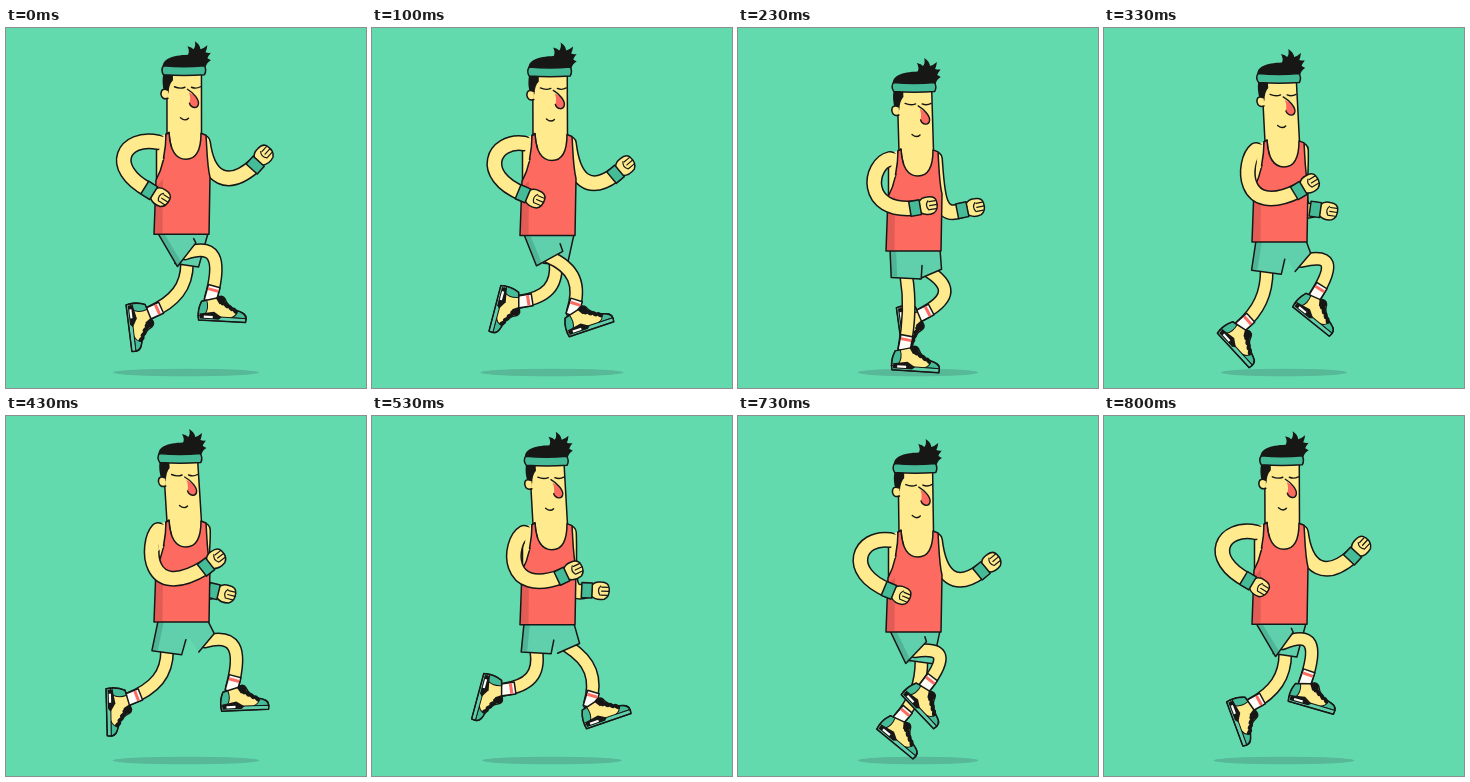
These frames come from a looping animation (360 px wide and 360 px high, 830 ms). An HTML page with a canvas:

```html
<!DOCTYPE html>
<html lang="en">
<head>
<meta charset="utf-8">
<title>Runner</title>
<style>
  html, body { margin: 0; width: 100%; height: 100%; overflow: hidden; background: #63d9ae; }
  canvas { display: block; width: 360px; height: 360px; }
</style>
</head>
<body>
<canvas id="stage"></canvas>
<script>
const canvas = document.getElementById('stage');
const ctx = canvas.getContext('2d');
const dpr = window.devicePixelRatio || 1;
canvas.width = canvas.height = 360 * dpr;

const LOOP = 830, POSES = 25;
const GROUND = '#63d9ae', SHADOW = '#57b997', INK = '#171716', SKIN = '#ffeb8d', SHIRT = '#fd6a60',
      SHORTS = '#60cfab', BAND = '#45bb98', WHITE = '#fffdf8', SHADE = 'rgba(90,20,40,.16)';

// The two ends of each arm swing, relative to the body
const NEAR_ARM = {
  shoulder: [152, 115], bow: 8,
  back: { upper: [118, 108], lower: [100, 140], wrist: [143, 163], turn: 32 },
  front: { upper: [140, 128], lower: [140, 189], wrist: [200, 152], turn: -38 }
};
const FAR_ARM = {
  shoulder: [197, 115], bow: 6,
  back: { upper: [202, 152], lower: [222, 162], wrist: [249, 138], turn: -48 },
  front: { upper: [198, 150], lower: [185, 185], wrist: [207, 176], turn: 14 }
};

const rad = deg => deg * Math.PI / 180;
const wave = (angle, lag = 0) => Math.cos(angle - rad(lag));
const mix = (a, b, t) => a + (b - a) * t;
const mixPoint = (p, q, t) => p.map((v, i) => mix(v, q[i], t));

function paint(d, fill, line = 1.5) {
  const path = new Path2D(d);
  if (fill) { ctx.fillStyle = fill; ctx.fill(path); }
  if (line) { ctx.strokeStyle = INK; ctx.lineWidth = line; ctx.stroke(path); }
}

function place(x, y, angle, draw) {
  ctx.save();
  ctx.translate(x, y);
  ctx.rotate(angle);
  draw();
  ctx.restore();
}

// Bent tube with round ends
function limb(start, c1, c2, end, width) {
  ctx.beginPath();
  ctx.moveTo(...start);
  ctx.bezierCurveTo(...c1, ...c2, ...end);
  for (const [color, w] of [[INK, width], [SKIN, width - 3]]) {
    ctx.strokeStyle = color;
    ctx.lineWidth = w;
    ctx.stroke();
  }
}

function sock() {
  paint('M-13 -6H3V6H-13Z', WHITE);
  paint('M-10.5 -5.2H-7.5V5.2H-10.5Z', SHIRT, 0);
}

function shoe() {
  const body = 'M-9 3L6 -1Q11 -5 14 -1C17 7 24 10 30 11.5Q38 14 36 22L-11 22Q-13 12 -9 3Z';
  paint(body, SKIN, 0);
  paint('M-9 3L-4 1.5Q-1 10 -5 16L-12 16Q-12 9 -9 3Z', BAND, 1);
  paint('M27 11Q37 12 36.5 18L21 18Q27 16 27 11Z', BAND, 1);
  paint('M5 -1Q11 -5 14 -1L15 3L9 5Z', INK, 0);
  ctx.fillStyle = INK;
  for (let i = 0; i < 4; i++) {
    ctx.beginPath();
    ctx.ellipse(11 + i * 4.6, 3 + i * 2.6, 3.6, 2, .9, 0, 2 * Math.PI);
    ctx.fill();
  }
  paint('M-12 17.5L36.5 18L36 22L-11 22Z', SHORTS, 1);
  paint('M-10 15.5L4 13L12 18L9 20.5L-10 20.5Z', INK, 0);
  paint('M-6 17.2H3V19.4H-6Z', WHITE, 0);
  paint(body, null);
}

// angle: place in the stride, zero with the knee raised in front
function leg(angle, dx, waist, near) {
  const lift = ((1 + wave(angle, -14)) / 2) ** 2;
  const bend = rad(112 * lift), thigh = rad(62 * lift - 8), reach = 33 + 12 * lift;
  const cuff = [170 + dx + 9 * wave(angle), waist + 25 - 5 * wave(angle, -14)];
  const knee = [cuff[0] + reach * Math.sin(bend), cuff[1] + reach * Math.cos(bend)];
  const ankle = [
    164 + dx + 42 * wave(angle, 14),
    287 + 17 * wave(angle, 115) + 13 * wave(2 * angle, 200) + 4 * wave(4 * angle, 40)
  ];
  const turn = 43 - 62 * wave(angle, 50);

  const shin = mixPoint(ankle, knee, .7);
  limb(cuff, mixPoint(cuff, knee, .7), shin, ankle, 14);
  place(...ankle, Math.atan2(ankle[1] - shin[1], ankle[0] - shin[0]), sock);
  place(...ankle, rad(turn), shoe);

  const half = near ? 15 : 12;
  const ox = half * Math.cos(thigh), oy = half * Math.sin(thigh);
  const ux = 7 * Math.sin(thigh), uy = 7 * Math.cos(thigh);
  // The hem sits a little below the start of the leg
  const hem = [cuff[0] + ux * .3, cuff[1] + uy * .3];
  const back = [hem[0] - ox, hem[1] + oy], front = [hem[0] + ox, hem[1] - oy];
  const left = near ? 152 : 172, right = near ? 190 : 202;
  paint(`M${left} ${waist}L${back}L${front}L${right} ${waist}Z`, SHORTS, 0);
  if (near) {
    paint(`M${left} ${waist}L${back}L${back[0] + 6} ${back[1] - 1}L${left + 6} ${waist}Z`, 'rgba(0,50,50,.16)', 0);
    paint(`M${left} ${waist}L${back}L${front}L${mixPoint(front, [185, waist], .45)}`);
  } else {
    paint(`M${back}L${front}L${right} ${waist}`);
  }
}

function hand() {
  paint('M5 -5.5Q8 -9.5 14 -9Q22 -9 22.5 -3Q23.5 5 18 8Q10 10 5 5.5Z', SKIN);
  paint('M15 -4H21.5M15 0H22.5M14.5 4H21M14 -5Q10 -1 13.5 4', null, 1.2);
  paint('M-5 -7.5H5.5V7.5H-5Z', BAND);
}

function arm({ shoulder, bow, back, front }, swing, drop) {
  const at = part => {
    const [x, y] = mixPoint(back[part], front[part], swing);
    return [x, y + drop];
  };
  const wrist = at('wrist');
  wrist[1] += 4 * bow * swing * (1 - swing);
  limb([shoulder[0], shoulder[1] + drop], at('upper'), at('lower'), wrist, 16);
  place(...wrist, rad(mix(back.turn, front.turn, swing)), hand);
}

function torso() {
  paint('M159 107L151 110L150.5 156L160 140Z', SKIN, 0);
  paint('M150.5 120V154', null);
  paint('M160 107C160 125 157 140 150 153L148 207H203L204 150C201 138 201 122 200 108L195 106' +
        'C195 124 190 132 180 132C170 132 164 124 163 105Z', SHIRT);
  paint('M149.5 160L157 152L156.5 206H148.8Z', SHADE, 0);
}

// Joins the near arm to the body under the strap
function strap() {
  paint('M153 109L160 110L157.5 132L152 136L153.5 120Z', SKIN, 0);
  paint('M160 107Q160 118 157.5 131L165 122Q163.5 114 163 105.5Z', SHIRT, 0);
  paint('M157.5 131Q160 118 160 107L163 105.5Q163.5 114 165.5 120', null);
}

function head(lean) {
  ctx.save();
  ctx.transform(1, 0, -lean / 64, 1, lean * 107 / 64, 0);
  paint('M161 44H195.5V108C195 124 190 132 180 132C170 132 163 124 161 106Z', SKIN, 0);
  paint('M161 46V107M195.5 46V107', null);
  paint('M157.5 46H167V53Q163 57 162.5 66L158 64Q155.5 55 157.5 46Z', INK, 0);
  paint('M162 63Q155 60 155 67Q156 73 162 71', SKIN);
  paint('M157 40C156 32 166 28 182 27.5Q184 24 181.5 19Q186 20 187.5 22Q190 19 189 14' +
        'Q194 17 194.5 22Q198 21 201.5 18Q201 22 199.5 25Q202 26 205 25.5Q202 29 201.5 31' +
        'L205 33Q201 35 199.5 40Z', INK, 0);
  paint('M157.5 38.5Q178 40.5 198.5 38.5Q201 43 198.5 47.5Q178 49 157.5 47.5Q154.5 43 157.5 38.5Z', BAND);
  paint('M168.5 59.5Q174 62 179 60M185.5 60Q190 62 194.5 59.5', null, 1.4);
  paint('M183 65C188 67 193 72 192.5 76.5C191.5 82 184.5 81 183.5 76Q185 70 183 65Z', SHIRT, 0);
  paint('M181.5 62C188 66 193 72 192.5 76.5C191.5 82 185 81 183.5 76', null, 1.4);
  paint('M174.5 90.5Q179 94.5 182.5 91', null, 1.4);
  ctx.restore();
}

function shifted(drop, draw) {
  ctx.save();
  ctx.translate(0, drop);
  draw();
  ctx.restore();
}

function draw(pose) {
  const angle = pose / POSES * 2 * Math.PI;
  const swing = (1 - Math.cos(angle)) / 2;
  // Two steps per stride: a slow start to the fall, then an even rise
  const step = 2 * angle - rad(14);
  const drop = 7.5 - 8.5 * Math.cos(step - .7 * Math.max(0, Math.sin(step)));
  const lean = 2 * wave(angle, 14) - 2;
  const waist = 206 + drop * .95;

  ctx.setTransform(dpr, 0, 0, dpr, 0, 0);
  ctx.lineJoin = ctx.lineCap = 'round';
  ctx.fillStyle = GROUND;
  ctx.fillRect(0, 0, 360, 360);

  ctx.fillStyle = SHADOW;
  ctx.beginPath();
  ctx.ellipse(180, 344.5, 72 - 1.3 * Math.min(drop, 9), 3.8, 0, 0, 2 * Math.PI);
  ctx.fill();

  arm(FAR_ARM, swing, drop);
  leg(angle + Math.PI, 20, waist, false);
  leg(angle, 0, waist, true);
  shifted(drop, () => { head(lean); torso(); });
  arm(NEAR_ARM, swing, drop);
  shifted(drop, strap);
}

// Thirty poses a second, starting on whole hundredths
function tick() {
  const t = Math.floor(performance.now() % LOOP / 10) * 10;
  draw(Math.floor((t + 4) * 3 / 100) % POSES);
  requestAnimationFrame(tick);
}
tick();
</script>
</body>
</html>
```
